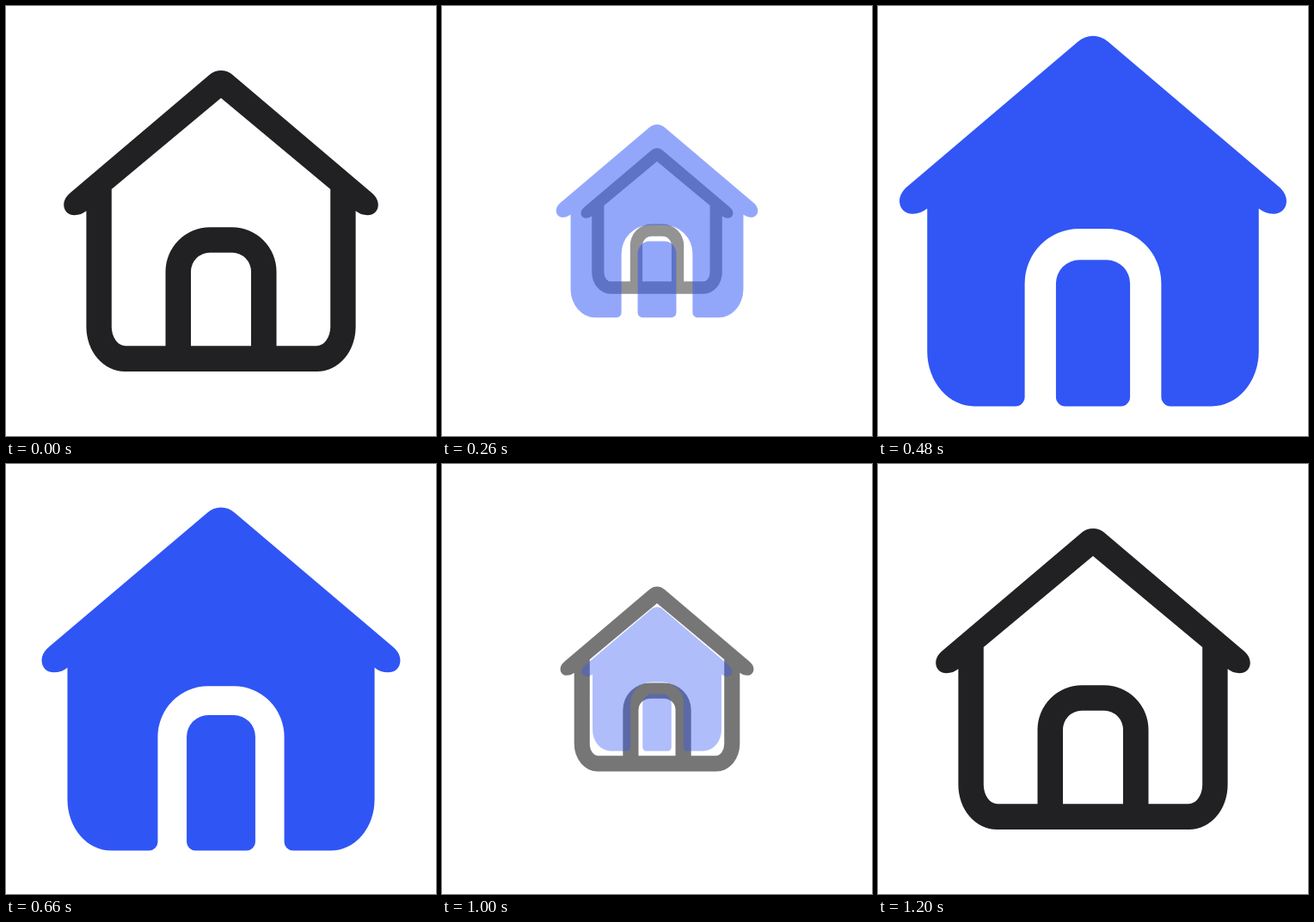
Recreate the animation shown at these times as an HTML page with a canvas. Size 500x500 px, loop 1220 ms.

```html
<!DOCTYPE html>
<html lang="en">
<head>
<meta charset="utf-8">
<title>Home icon toggle</title>
<style>
  html, body { margin: 0; width: 100%; height: 100%; overflow: hidden; background: #fff; }
  canvas { display: block; width: 500px; height: 500px; }
</style>
</head>
<body>
<canvas id="stage" width="500" height="500"></canvas>
<script>
const ctx = document.getElementById('stage').getContext('2d');

const LOOP = 1220, STEP = 20;
const FILLED = 509, PRESSED = 652, RELEASED = 727, OUTLINED = 1200;
const FILL_SIZE = 1.2425, PRESS_SCALE = 0.915;

// Roof and right wall, down to the bottom edge
const roofRight = 'M236 80.5C244 73.2 256 73.2 264 80.5L425 217C430.5 221.5 432.9 226.5 432.8 231.5' +
  'C432.5 239 427 243.2 420.5 243.2C415 243.2 410.5 241.5 406.6 238.3V373A44.6 52 0 0 1 362 425';
// Left wall, back up to the roof
const wallLeft = 'H138A44.6 52 0 0 1 93.4 373V238.3C89.5 241.5 85 243.2 79.5 243.2' +
  'C73 243.2 67.5 239 67.2 231.5C67.1 226.5 69.5 221.5 75 217Z';

const outline = new Path2D(
  roofRight + wallLeft +
  'M250 107L377.2 213V373A16.2 22.3 0 0 1 361 395.3H314.5V309A51.5 51.7 0 0 0 263 257.3H237' +
  'A51.5 51.7 0 0 0 185.5 309V395.3H139A16.2 22.3 0 0 1 122.8 373V213Z' +
  'M215 395.3V309A22 22.2 0 0 1 237 286.8H263A22 22.2 0 0 1 285 309V395.3Z');

const solid = new Path2D(
  roofRight +
  'H323.3A8.8 8.8 0 0 1 314.5 416.2V309A51.5 51.7 0 0 0 263 257.3H237' +
  'A51.5 51.7 0 0 0 185.5 309V416.2A8.8 8.8 0 0 1 176.7 425' + wallLeft +
  'M215 416.2V309A22 22.2 0 0 1 237 286.8H263A22 22.2 0 0 1 285 309V416.2' +
  'A8.8 8.8 0 0 1 276.2 425H223.8A8.8 8.8 0 0 1 215 416.2Z');

function ease(time, start, end) {
  const x = Math.min(1, Math.max(0, (time - start) / (end - start)));
  return x * x * (3 - 2 * x);
}

function drawIcon(path, color, scale, alpha) {
  if (alpha <= 0) return;
  ctx.save();
  ctx.globalAlpha = alpha;
  ctx.fillStyle = color;
  ctx.translate(250, 250);
  ctx.scale(scale, scale);
  ctx.translate(-250, -250);
  ctx.fill(path, 'evenodd');
  ctx.restore();
}

function draw(time) {
  const filled = ease(time, 0, FILLED) - ease(time, RELEASED, OUTLINED);
  const pressed = ease(time, FILLED, PRESSED) - ease(time, PRESSED, RELEASED);
  const press = 1 - (1 - PRESS_SCALE) * pressed;
  ctx.fillStyle = '#fff';
  ctx.fillRect(0, 0, 500, 500);
  drawIcon(outline, '#212123', 1 - filled, 1 - filled);
  drawIcon(solid, '#3055f5', FILL_SIZE * filled * press, filled);
}

const startTime = performance.now();

function tick() {
  const elapsed = (performance.now() - startTime) % LOOP;
  draw(Math.floor(elapsed / STEP) * STEP);
  requestAnimationFrame(tick);
}
tick();
</script>
</body>
</html>
```
